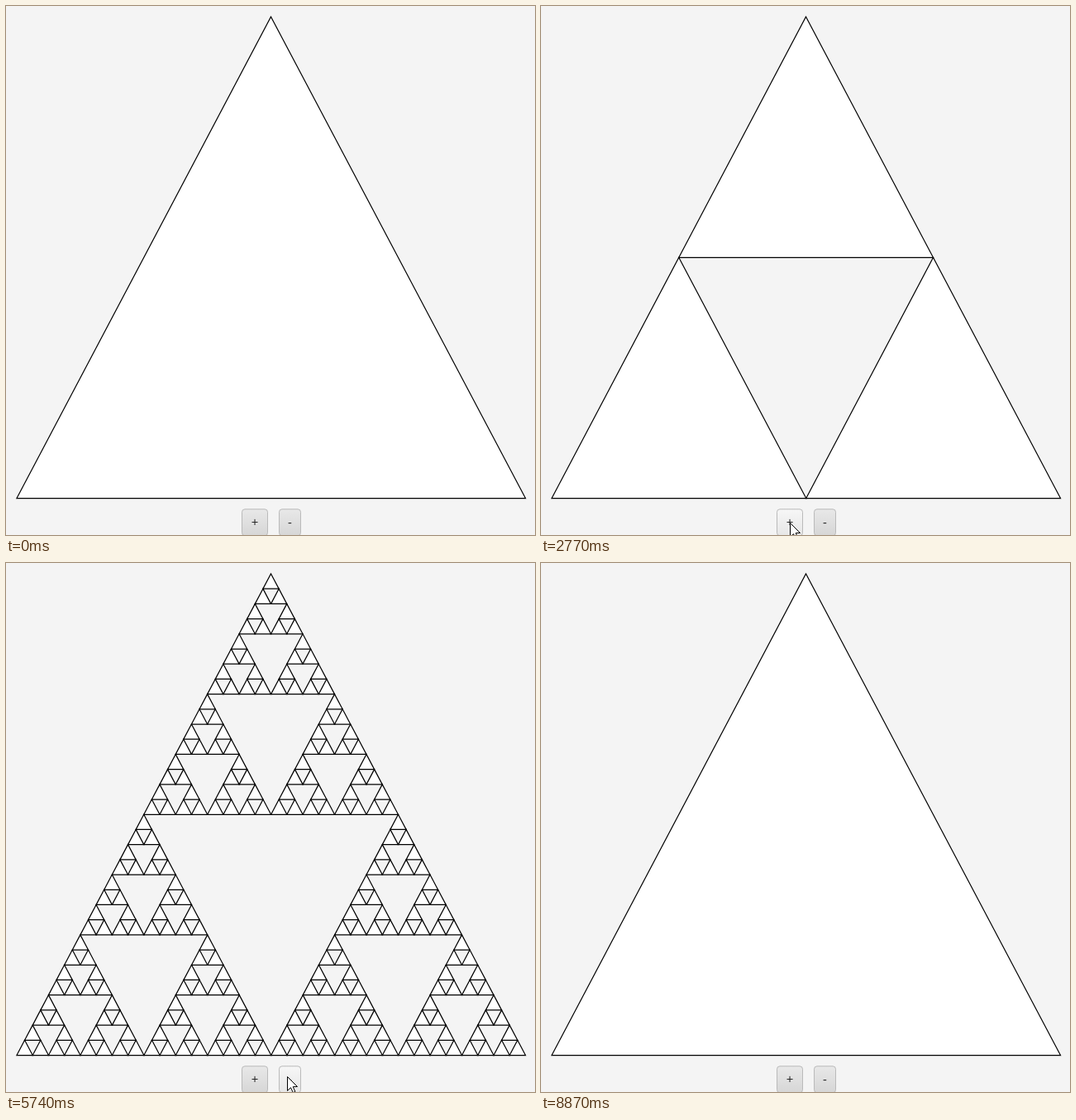
These frames come from a looping animation (640x640 px, 8.9 s). An HTML page with a canvas:

```html
<!DOCTYPE html>
<html lang="en">
<head>
<meta charset="utf-8">
<title>Triangle subdivision</title>
<style>
  html, body { margin: 0; width: 100%; height: 100%; overflow: hidden; background: #f4f4f4; }
  canvas { display: block; width: 640px; height: 640px; }
</style>
</head>
<body>
<canvas id="stage" width="640" height="640"></canvas>
<script>
const ctx = document.getElementById('stage').getContext('2d');
const LOOP = 8900;
const PRESS = 120; // how long a button is held before its click counts

// evenly paced clicks: first click and the gap between clicks
const series = (first, gap) => Array.from({ length: 5 }, (_, i) => first + i * gap);

const plus = { label: '+', x: 285.5, w: 31, clicks: series(2600, 425) };
const minus = { label: '-', x: 330.5, w: 26, clicks: series(6110, 395) };

// time, x, y of the pointer tip
const path = [
  [1150, 234, 641], [1460, 279, 597], [1900, 296, 618], [2250, 301, 625],
  [4800, 301, 625], [5350, 340, 621], [5900, 340, 621], [6100, 343, 620],
  [7750, 343, 620], [8080, 645, 626]
];

const arrow = [[0, 0], [0, 17], [4, 13.2], [6.8, 19.2], [9.4, 18], [6.7, 12.2], [12, 12]];

function polygon(points) {
  ctx.beginPath();
  points.forEach(([x, y]) => ctx.lineTo(x, y));
  ctx.closePath();
  ctx.fill();
  ctx.stroke();
}

const mid = (a, b) => [(a[0] + b[0]) / 2, (a[1] + b[1]) / 2];

function sierpinski(top, left, right, level) {
  if (level === 0) {
    polygon([top, left, right]);
    return;
  }
  const l = mid(top, left), r = mid(top, right), b = mid(left, right);
  sierpinski(top, l, r, level - 1);
  sierpinski(l, left, b, level - 1);
  sierpinski(r, b, right, level - 1);
}

function pointerAt(t) {
  for (let i = 1; i < path.length; i++) {
    const [t0, x0, y0] = path[i - 1];
    const [t1, x1, y1] = path[i];
    if (t >= t0 && t <= t1) {
      const k = (t - t0) / (t1 - t0);
      return { x: Math.round(x0 + (x1 - x0) * k), y: Math.round(y0 + (y1 - y0) * k) };
    }
  }
  return null;
}

const countClicks = (button, t) => button.clicks.filter(c => t >= c).length;

function drawButton(button, pointer, t) {
  const { x, w, label, clicks } = button;
  const over = pointer && pointer.y >= 609 && pointer.x >= x && pointer.x <= x + w;
  const down = clicks.some(c => t >= c - PRESS && t < c);
  const [from, to] = down ? ['#d4d4d4', '#dedede']
    : over ? ['#f6f6f6', '#e6e6e6'] : ['#e8e8e8', '#d6d6d6'];
  const shade = ctx.createLinearGradient(0, 609, 0, 641);
  shade.addColorStop(0, from);
  shade.addColorStop(1, to);
  ctx.fillStyle = shade;
  ctx.strokeStyle = down ? '#18a8d4' : '#bababa';
  ctx.lineWidth = down ? 1.8 : 1;
  ctx.beginPath();
  ctx.roundRect(x, 608.8, w, 32, 3.5);
  ctx.fill();
  ctx.stroke();
  ctx.fillStyle = '#222';
  ctx.font = '15px "Open Sans", sans-serif';
  ctx.textAlign = 'center';
  ctx.textBaseline = 'alphabetic';
  ctx.fillText(label, x + w / 2, 630);
}

function drawPointer({ x, y }) {
  ctx.save();
  ctx.translate(x + 0.5, y + 0.5);
  ctx.fillStyle = '#fff';
  ctx.strokeStyle = '#000';
  ctx.lineWidth = 1;
  polygon(arrow);
  ctx.restore();
}

function draw(t) {
  ctx.fillStyle = '#f4f4f4';
  ctx.fillRect(0, 0, 640, 640);

  ctx.fillStyle = '#fff';
  ctx.strokeStyle = '#000';
  ctx.lineWidth = 1.25;
  const level = countClicks(plus, t) - countClicks(minus, t);
  sierpinski([320.5, 13], [13, 595.5], [628.5, 595.5], level);

  const pointer = pointerAt(t);
  drawButton(plus, pointer, t);
  drawButton(minus, pointer, t);
  if (pointer) drawPointer(pointer);
}

const start = performance.now();
function tick() {
  draw((performance.now() - start) % LOOP);
  requestAnimationFrame(tick);
}
tick();
</script>
</body>
</html>
```
